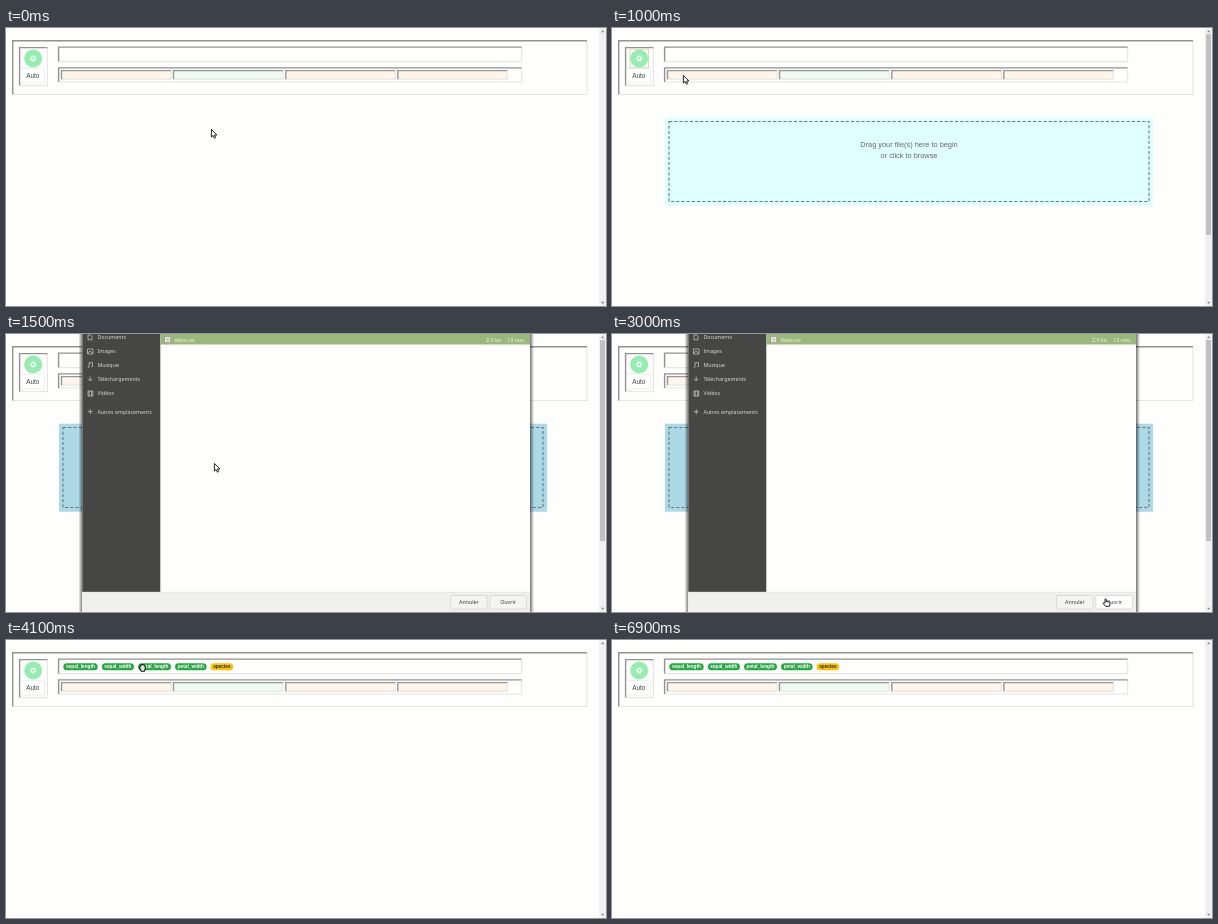
An HTML page that plays this animation: 600x278 px, repeating every 8 s.

```html
<!DOCTYPE html>
<html lang="fr">
<head>
<meta charset="utf-8">
<title>File picker</title>
<style>
html, body { margin: 0; width: 100%; height: 100%; overflow: hidden; background: #fefefd; }
svg { display: block; width: 600px; height: 278px; }
text { font-family: "Liberation Sans", Arial, sans-serif; }
.dialog text { font-family: "Noto Sans", sans-serif; font-size: 5.3px; }
.side text { fill: #d6d6d3; }
.row text { fill: #f6f8ee; }
.pills text { font-size: 4.75px; font-weight: 700; text-anchor: middle; }
.zone text { font-size: 7.37px; fill: #666; text-anchor: middle; }
</style>
</head>
<body>
<svg id="stage" viewBox="0 0 600 278">
  <defs>
    <linearGradient id="shadeL"><stop offset="0" stop-color="#000" stop-opacity="0"/><stop offset="1" stop-color="#000" stop-opacity=".55"/></linearGradient>
    <linearGradient id="shadeR"><stop offset="0" stop-color="#000" stop-opacity=".55"/><stop offset="1" stop-color="#000" stop-opacity="0"/></linearGradient>
  </defs>
  <g id="page"></g>
  <g id="zone" class="zone"></g>
  <g id="pills" class="pills"></g>
  <g id="dialog" class="dialog"></g>
  <g id="cursor">
    <path id="arrow" d="M.4 .4V8L2.1 6.5 3.4 9.2 4.7 8.6 3.5 6H5.9Z" fill="#fff" stroke="#111" stroke-width=".9"/>
    <path id="hand" d="M2 .6Q3 0 3.3 1V3.1L6 3.5Q7.2 3.8 7 5L6.5 7.8H2.6L.4 5.2Q0 4 1.2 4.1L2 4.6Z" fill="#fff" stroke="#111" stroke-width=".95"/>
    <path id="grab" d="M.6 2.5Q.7 .8 2 1.1 3 0 4 1 5.4 .8 5.7 2.6V5.2L4.8 7.2H1.9L.3 4.8Z" fill="#dfe8df" stroke="#111" stroke-width="1.1"/>
    <path id="beam" d="M0 .5H3.2M1.6 .5V7.7M0 7.7H3.2" fill="none" stroke="#181818" stroke-width="1.5"/>
  </g>
</svg>
<script>
const LOOP = 8000, STEP = 100;
const $ = id => document.getElementById(id);

const rect = (x, y, w, h, fill, more = "") =>
  `<rect x="${x}" y="${y}" width="${w}" height="${h}" fill="${fill}" ${more}/>`;
const text = (x, y, s, more = "") => `<text x="${x}" y="${y}" ${more}>${s}</text>`;
const line = (d, color, width, more = "") =>
  `<path d="${d}" fill="none" stroke="${color}" stroke-width="${width}" ${more}/>`;

// Sunken frame: dark top and left, pale bottom and right
const inset = (x, y, w, h, fill, dark = "#929292") =>
  rect(x, y, w, h, fill) +
  line(`M${x + w} ${y}V${y + h}H${x}`, "#e6e6e4", 1.2) +
  line(`M${x} ${y + h}V${y}H${x + w}`, dark, 1.4);

function drawPage() {
  const cells = [55.5, 167.5, 279.8, 391.8]
    .map((x, i) => inset(x, 42.6, 109.5, 8.6, i === 1 ? "#effbf1" : "#fff6e9", "#969696")).join("");
  $("page").innerHTML =
    inset(6.7, 12.7, 574.3, 53.8, "#fefefd") +
    inset(13.6, 19.6, 27.8, 38, "#fefefd") +
    rect(14.8, 40.3, 23.7, 14.8, "#fff", 'rx="1" stroke="#e5e5e3" stroke-width=".7"') +
    '<circle cx="27.2" cy="30.5" r="9" fill="#96edb0"/>' +
    '<circle cx="27.2" cy="30.5" r="1.9" fill="none" stroke="#fff" stroke-width="1.3"/>' +
    '<circle cx="27.2" cy="30.5" r="2.8" fill="none" stroke="#fff" stroke-width=".8" stroke-dasharray="1.1 1.1"/>' +
    rect(18, 21.2, 18.6, 18.6, "none", 'id="focus" stroke="#d5cfae" stroke-width=".8"') +
    text(20.2, 49.8, "Auto", 'font-size="6.4" fill="#444"') +
    inset(52.6, 19.1, 463, 14.5, "#fefefd") +
    inset(52.6, 39.9, 463, 14.1, "#fefefd") + cells +
    rect(593, 0, 7, 278, "#f1f1f1") +
    rect(594, 6, 5, 201, "#c1c1c1", 'id="thumb"') +
    '<path d="M595 4.2L596.7 2 598.4 4.2ZM595 273.8L596.7 276 598.4 273.8Z" fill="#8f8f8f"/>';
}

function drawZone() {
  $("zone").innerHTML =
    rect(53, 89.7, 488, 88, "#e0ffff", 'id="fill"') +
    rect(57, 93.5, 480, 80, "none", 'stroke="#627d80" stroke-width="1.1" stroke-dasharray="3.2 2"') +
    text(297, 119.2, "Drag your file(s) here to begin") +
    text(297, 130.2, "or click to browse");
}

function drawPills() {
  const tags = [
    ["sepal_length", 57.3, 34.4], ["sepal_width", 95.8, 32.2], ["petal_length", 132, 33],
    ["petal_width", 169, 31.6], ["species", 204.6, 22.6]];
  $("pills").innerHTML = tags.map(([name, x, w]) => {
    const plain = name === "species";
    return rect(x, 23.3, w, 7, plain ? "#ffc107" : "#28a745", 'rx="3.5"') +
      text(x + w / 2, 28.3, name, `fill="${plain ? "#292d31" : "#fff"}"`);
  }).join("");
}

function drawDialog() {
  const places = [["Documents", 5.3], ["Images", 19.3], ["Musique", 33.3],
    ["Téléchargements", 47.3], ["Vidéos", 61.3], ["Autres emplacements", 79.6]];
  const icons = [
    "M82 1V5.8H86V2.3L84.7 1Z",
    "M81.5 15H87V20H81.5ZM82 19L84 17 86.5 19.5",
    "M83 33V28.7H86.5V32.5M81.8 33.3H83M85.4 32.7H86.5",
    "M84.2 42.5V46.5M82 44.8L84.2 47 86.4 44.8",
    "M82 57H86.8V62H82ZM83.2 57V62M85.6 57V62",
    "M81.8 77.7H86.8M84.3 75.2V80.2"];
  const button = (x, label, id) =>
    rect(x, 261.4, 36.6, 13.6, "#f4f4f3", `id="${id}" rx="1.5" stroke="#d3d3d0" stroke-width=".8"`) +
    text(x + 18.3, 270, label, 'fill="#3c3c3c" text-anchor="middle"');
  $("dialog").innerHTML =
    rect(72.5, 0, 4, 278, "url(#shadeL)") + rect(524, 0, 4, 278, "url(#shadeR)") +
    rect(76.3, 0, 447.7, 278, "#fefefd") +
    rect(76.3, 0, 78, 258, "#464644") +
    '<g class="side">' + places.map(([s, y]) => text(91.4, y, s)).join("") +
    icons.map(d => line(d, "#c0c0bd", .8)).join("") + "</g>" +
    '<g class="row">' + rect(154.3, 0, 369.7, 10.5, "#9ab87d") +
    rect(158.7, 2.4, 6, 6.4, "#eceee8", 'stroke="#788267" stroke-width=".5"') +
    line("M160 4.3H163.4M160 5.8H163.4M160 7.2H163.4", "#9a9c96", .5) +
    text(168.5, 7.6, "data.csv") +
    text(495, 7.6, "2,9 ko", 'text-anchor="end"') + text(519, 7.6, "13 nov.", 'text-anchor="end"') + "</g>" +
    rect(76.3, 258, 447.7, 20, "#f0f0ef") + line("M76.3 258.2H524", "#dededb", .6) +
    button(444.6, "Annuler", "cancel") + button(483.8, "Ouvrir", "open");
}

// Pointer path: time, x, y
const path = [
  [0, 205, 101], [500, 26, 29], [600, 27, 30], [1000, 71, 47], [1300, 202, 124],
  [1500, 208, 129], [1600, 208, 130], [1800, 208, 130], [2200, 187, 45], [2700, 485, 258],
  [2800, 490, 264], [3000, 491, 264.5], [3100, 491, 264.5], [3600, 196, 52], [4100, 133.5, 24],
  [4500, 81, 23.5], [4700, 70, 23.5], [4800, 70, 23.5], [5400, 216, 24.5], [5700, 208, 23],
  [6600, 208, 23], [6700, 272, 75], [6800, 391, 158], [LOOP, 391, 158]];

// Pointer shape from each time on
const shapes = [
  [0, "arrow"], [500, "hand"], [700, "arrow"], [2800, "hand"], [3100, "arrow"],
  [4000, "grab"], [5600, "beam"], [6700, "arrow"], [6900, "none"]];

function pointer(t) {
  const i = Math.max(1, path.findIndex(p => p[0] > t));
  const [t0, x0, y0] = path[i - 1], [t1, x1, y1] = path[i];
  const k = (t - t0) / (t1 - t0);
  return [x0 + (x1 - x0) * k, y0 + (y1 - y0) * k];
}

const show = (id, on) => { $(id).style.display = on ? "" : "none"; };
const within = (t, a, b) => t >= a && t < b;

function render(t) {
  const dropping = within(t, 600, 3300);
  show("zone", dropping);
  show("thumb", dropping);
  show("focus", within(t, 600, 1400));
  show("dialog", within(t, 1400, 3100));
  show("pills", t >= 3300);
  $("fill").setAttribute("fill", within(t, 1200, 3100) ? "#add8e6" : "#e0ffff");
  $("open").setAttribute("fill", within(t, 2800, 3100) ? "#fff" : "#f4f4f3");

  const shape = shapes.filter(s => s[0] <= t).pop()[1];
  for (const id of ["arrow", "hand", "grab", "beam"]) show(id, id === shape);
  const [x, y] = pointer(t);
  $("cursor").setAttribute("transform", `translate(${x} ${y})`);
}

drawPage();
drawZone();
drawPills();
drawDialog();

const start = performance.now();
function tick() {
  const t = (performance.now() - start) % LOOP;
  render(Math.floor(t / STEP) * STEP);
  requestAnimationFrame(tick);
}
tick();
</script>
</body>
</html>
```
